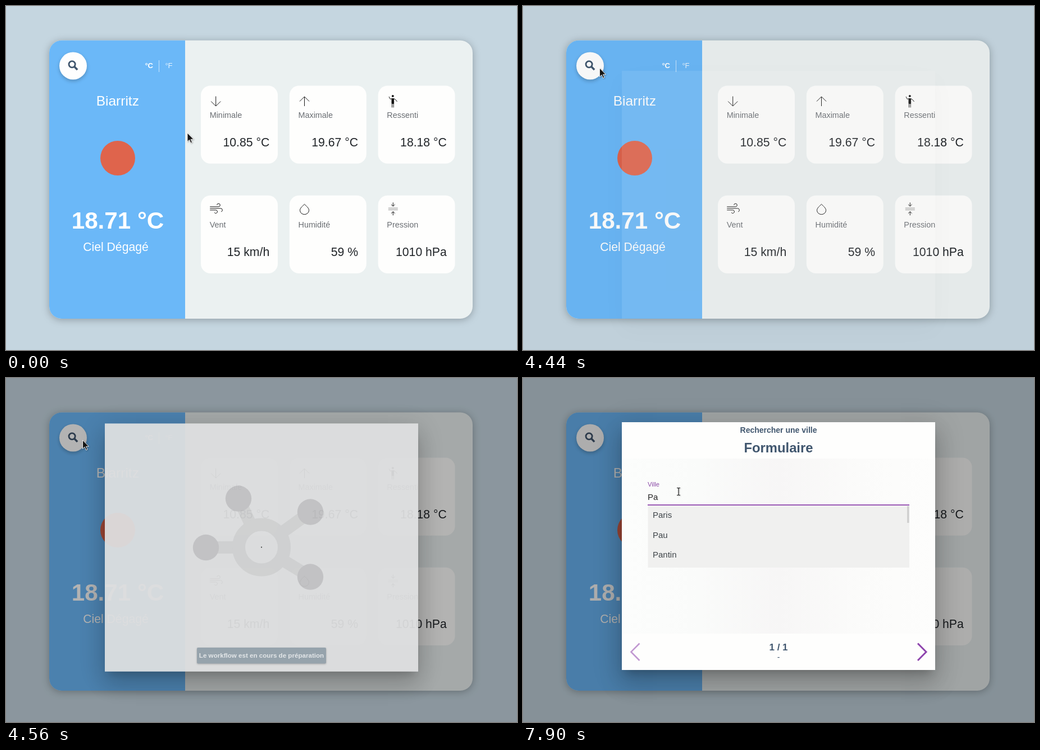
Recreate the animation shown at these times as an HTML page. Size 910x615 px, loop 8 s.

```html
<!DOCTYPE html>
<html lang="fr">
<head>
<meta charset="utf-8">
<title>Météo</title>
<style>
  html, body { margin: 0; width: 100%; height: 100%; overflow: hidden; background: #c5d6e0; }
  body { position: relative; font-family: "Liberation Sans", Arial, sans-serif; }
  svg { position: absolute; left: 0; top: 0; display: block; }
  text { white-space: pre; }
  #shade { position: absolute; inset: 0; background: #000; opacity: 0; }
  #modal {
    position: absolute; left: 176px; top: 79px; width: 558px; height: 443px; background: #fefefd;
    box-shadow: 0 11px 15px -7px rgba(0,0,0,.2), 0 24px 38px 3px rgba(0,0,0,.14), 0 9px 46px 8px rgba(0,0,0,.12);
  }
  .panel { filter: drop-shadow(0 2px 7px rgba(0,0,0,.27)); }
  .round { filter: drop-shadow(0 3px 3px rgba(0,0,0,.22)); }
  .pointer { filter: drop-shadow(1px 1.5px 1px rgba(0,0,0,.3)); }
  .icon { fill: none; stroke: #161616; stroke-width: 1; }
  .mid { text-anchor: middle; }
  .b { font-weight: bold; }
  .ink { fill: #40566e; }
</style>
</head>
<body>
<svg width="910" height="615" viewBox="0 0 910 615">
  <g class="panel">
    <rect x="77" y="61.5" width="754" height="497.5" rx="22" fill="#ebf1f1"/>
    <path d="M319 61.5H99a22 22 0 0 0-22 22V537a22 22 0 0 0 22 22H319Z" fill="#6bb8f8"/>
  </g>
  <circle class="round" cx="119.5" cy="107" r="24.5" fill="#fefefe"/>
  <g fill="none" stroke="#40566e" stroke-width="2.8">
    <circle cx="117.6" cy="104.3" r="5.6"/>
    <path d="M121.8 108.5L127.2 114" stroke-width="3.4"/>
  </g>
  <g fill="#fff">
    <text class="b" x="247.4" y="111" font-size="13">°C</text>
    <text x="283.4" y="111" font-size="13" opacity=".85">°F</text>
    <rect x="272" y="97" width="1" height="21" opacity=".65"/>
    <g class="mid">
      <text x="198.8" y="178" font-size="24.5">Biarritz</text>
      <text class="b" x="199" y="398" font-size="42.2">18.71 °C</text>
      <text x="195.5" y="437.5" font-size="21.2">Ciel Dégagé</text>
    </g>
  </g>
  <circle cx="199" cy="272" r="31" fill="#df644c"/>
  <g id="cards"></g>
</svg>

<div id="shade"></div>

<div id="modal">
  <svg width="558" height="443" viewBox="176 79 558 443">
    <defs>
      <linearGradient id="tint">
        <stop offset="0" stop-color="#fcfdfc"/>
        <stop offset=".25" stop-color="#fafbfa"/>
        <stop offset=".5" stop-color="#f7f6f6"/>
        <stop offset=".75" stop-color="#fbfbfa"/>
        <stop offset="1" stop-color="#fdfdfc"/>
      </linearGradient>
    </defs>
    <g id="form">
      <rect x="176" y="144" width="558" height="313" fill="url(#tint)"/>
      <g class="mid ink">
        <text class="b" x="455" y="98" font-size="14">Rechercher une ville</text>
        <text class="b" x="455" y="133" font-size="23.8">Formulaire</text>
        <text class="b" x="455" y="487" font-size="17">1 / 1</text>
        <text x="455" y="504" font-size="14">-</text>
      </g>
      <g fill="none" stroke="#8e44ad">
        <path d="M207.5 474.5L192.5 489.7 207.5 505" stroke-width="2.6" opacity=".55"/>
        <path d="M703 474.5L718 489.7 703 505" stroke-width="3"/>
      </g>
      <text id="label" x="222">Ville</text>
      <rect x="222" y="227" width="466" height="1" fill="#949494"/>
      <rect id="line" y="226" height="2" fill="#9a59b5"/>
      <text id="typed" x="222" y="218" font-size="15" fill="#262626"></text>
      <rect id="caret" y="205" width="1" height="16" fill="#222"/>
      <g id="drop">
        <rect x="222.5" y="228.5" width="465.5" height="110.5" fill="#f0f0ef"/>
        <rect x="684" y="229" width="3.6" height="30" fill="#d0d0d0"/>
        <g font-size="15" fill="#3e4449">
          <text class="city" x="231" y="250"></text>
          <text class="city" x="231" y="285.5"></text>
          <text class="city" x="231" y="321"></text>
        </g>
      </g>
    </g>
    <g id="loader">
      <rect x="176" y="79" width="558" height="443" fill="#dfe0e1"/>
      <g id="hub"></g>
      <circle cx="455" cy="300" r="1" fill="#222"/>
      <rect x="340" y="479.5" width="230" height="28.5" rx="2" fill="#95a3ad" filter="drop-shadow(0 1px 1.5px rgba(0,0,0,.25))"/>
      <text class="b mid" x="455" y="497.6" font-size="12" style="font-size:11.6px" fill="#e8ebed">Le workflow est en cours de préparation</text>
    </g>
  </svg>
</div>

<svg width="910" height="615" viewBox="0 0 910 615">
  <g id="pointer" class="pointer">
    <path d="M0 0V15.5L3.6 12.2 6 18 8.5 17 6.1 11.3H11Z" fill="#151515" stroke="#fff" stroke-width=".9"/>
    <path d="M-1.5 9V1.2a1.5 1.5 0 0 1 3 0V6l6 1.2q1.5.5 1.3 2.5l-1 6H0L-5 9.5q1-2.5 3.5-.5Z" fill="#fff" stroke="#222" stroke-width="1.1"/>
    <path d="M-3-6.5h2.2l.8.8.8-.8H3M-3 6.5h2.2l.8-.8.8.8H3M0-6V6" fill="none" stroke="#222" stroke-width="1.2"/>
  </g>
</svg>

<script>
const LOOP = 8000;
const $ = id => document.getElementById(id);
const clamp = v => Math.max(0, Math.min(1, v));
const ramp = (t, a, b) => clamp((t - a) / (b - a));
const easeOut = u => 1 - (1 - u) ** 2;
const smooth = u => u * u * (3 - 2 * u);
const mix = (a, b, u) => a + (b - a) * u;
const within = (t, a, b) => t >= a && t < b;

const icons = {
  down: '<path d="M10.5 5V22M2 14L10.5 22.5 19 14"/>',
  up: '<path d="M10.5 22.5V5.5M2 14L10.5 5.5 19 14"/>',
  person: '<circle cx="10" cy="4.5" r="1.5" fill="#111"/><path d="M8.2 9h3.6v9H8.2z" fill="#111"/>' +
    '<path d="M8.7 17V25M11.3 17V25M8.5 9L5.5 10 3.2 5.5M11.5 9L14.5 10.5 17.8 14.5"/>',
  wind: '<path d="M0 6H15.5a2.8 2.8 0 1 0-3-3M0 9H18.5a3.1 3.1 0 0 1 1.5 6M0 12H10a2.9 2.9 0 1 1-2.2 4.3"/>',
  drop: '<path d="M10.5 1.5C7 5 2.5 8.5 2.5 12.5a8 7.3 0 0 0 16 0C18.5 8.5 14 5 10.5 1.5Z"/>',
  press: '<path d="M2 8.5H19M2 11.5H19" stroke="#888"/><path d="M10.5-1.5V5M7.2 2L10.5 5.2 13.8 2M10.5 21.5V15M7.2 18L10.5 14.8 13.8 18"/>'
};
const facts = [
  ['down', 'Minimale', '10.85 °C'], ['up', 'Maximale', '19.67 °C'], ['person', 'Ressenti', '18.18 °C'],
  ['wind', 'Vent', '15 km/h'], ['drop', 'Humidité', '59 %'], ['press', 'Pression', '1010 hPa']
];
$('cards').innerHTML = facts.map(([icon, name, value], i) => {
  const x = 347 + (i % 3) * 157.8, y = 142.5 + (i > 2 ? 196.3 : 0);
  return `<g transform="translate(${x} ${y})">
    <rect width="137" height="139.2" rx="17" fill="#fefefd"/>
    <g class="icon" transform="translate(16.2 14)">${icons[icon]}</g>
    <text x="15.7" y="57.5" font-size="14.4" fill="#6a6e73">${name}</text>
    <text x="122.2" y="108" font-size="21.2" text-anchor="end" fill="#212529">${value}</text>
  </g>`;
}).join('');

const nodes = [[414, 213], [542, 237], [356, 300.5], [542, 353]];
$('hub').innerHTML =
  nodes.map(([x, y]) => `<path d="M455 300L${x} ${y}" stroke="#d2d3d4" stroke-width="22"/>`).join('') +
  '<circle cx="455" cy="300" r="40.5" fill="#dfe0e1" stroke="#d2d3d4" stroke-width="23"/>' +
  nodes.map(([x, y]) => `<circle cx="${x}" cy="${y}" r="23.2" fill="#c4c4c6"/>`).join('');

// time, x, y of the pointer
const route = [
  [0, 323, 227], [79, 323, 227], [80, 284, 226], [1120, 284, 226], [1550, 342, 207], [1920, 400, 211],
  [2020, 400, 211.5], [2720, 299, 206], [2800, 299, 206], [3340, 209, 123], [3640, 136.5, 111],
  [7560, 136.5, 111], [7860, 277, 203], [LOOP, 277, 203]
];
function pointerAt(t) {
  const i = Math.max(1, route.findIndex(p => p[0] > t));
  const a = route[i - 1], b = route[i], u = ramp(t, a[0], b[0]);
  return [mix(a[1], b[1], u), mix(a[2], b[2], u)];
}

const shapes = [...$('pointer').children];
const cities = [...document.querySelectorAll('.city')];

function drawPointer(t) {
  const [x, y] = pointerAt(t);
  const kind = t < 4960 ? 0 : t < 7580 ? 1 : x > 222 && y > 197 ? 2 : 0;
  $('pointer').setAttribute('transform', `translate(${x + (kind === 1 ? 1.5 : 0)} ${y})`);
  shapes.forEach((s, i) => s.style.display = i === kind ? '' : 'none');
}

function drawModal(t) {
  const open = easeOut(ramp(t, 4434, 4604));
  $('shade').style.opacity = .32 * open;
  $('modal').style.opacity = open;
  $('modal').style.transform = `translateY(${40 * (1 - open)}px)`;
  const leave = ramp(t, 4590, 4690);
  $('loader').style.opacity = ramp(t, 4440, 4535) * (1 - leave);
  $('form').style.opacity = leave;
}

function drawField(t) {
  const focus = smooth(ramp(t, 4950, 5110));
  const label = $('label');
  label.setAttribute('y', mix(218, 194, focus));
  label.setAttribute('font-size', mix(15, 11.25, focus));
  label.setAttribute('fill', focus > .1 ? '#8a48a6' : '#757575');
  $('line').setAttribute('x', 455 - 233 * focus);
  $('line').setAttribute('width', 466 * focus);

  const word = t < 6300 ? '' : t < 7200 ? 'P' : 'Pa';
  $('typed').textContent = word;
  $('caret').setAttribute('x', [222, 232, 240.5][word.length]);
  const lit = within(t, 5060, 5560) || within(t, 6180, 6800) || within(t, 7200, 7700);
  $('caret').style.display = lit ? '' : 'none';
}

function drawList(t) {
  const names = t < 7440 ? ['Paris', 'Perpignan', 'Poitiers'] : ['Paris', 'Pau', 'Pantin'];
  cities.forEach((c, i) => c.textContent = names[i]);
  const show = easeOut(t < 7440 ? ramp(t, 6640, 6900) : ramp(t, 7570, 7800));
  $('drop').style.opacity = show;
  $('drop').setAttribute('transform', `translate(0 ${228.5 * .2 * (1 - show)}) scale(1 ${.8 + .2 * show})`);
}

function draw(t) {
  drawPointer(t);
  drawModal(t);
  drawField(t);
  drawList(t);
}

const start = performance.now();
function tick() {
  draw((performance.now() - start) % LOOP);
  requestAnimationFrame(tick);
}
draw(0);
requestAnimationFrame(tick);
</script>
</body>
</html>
```
